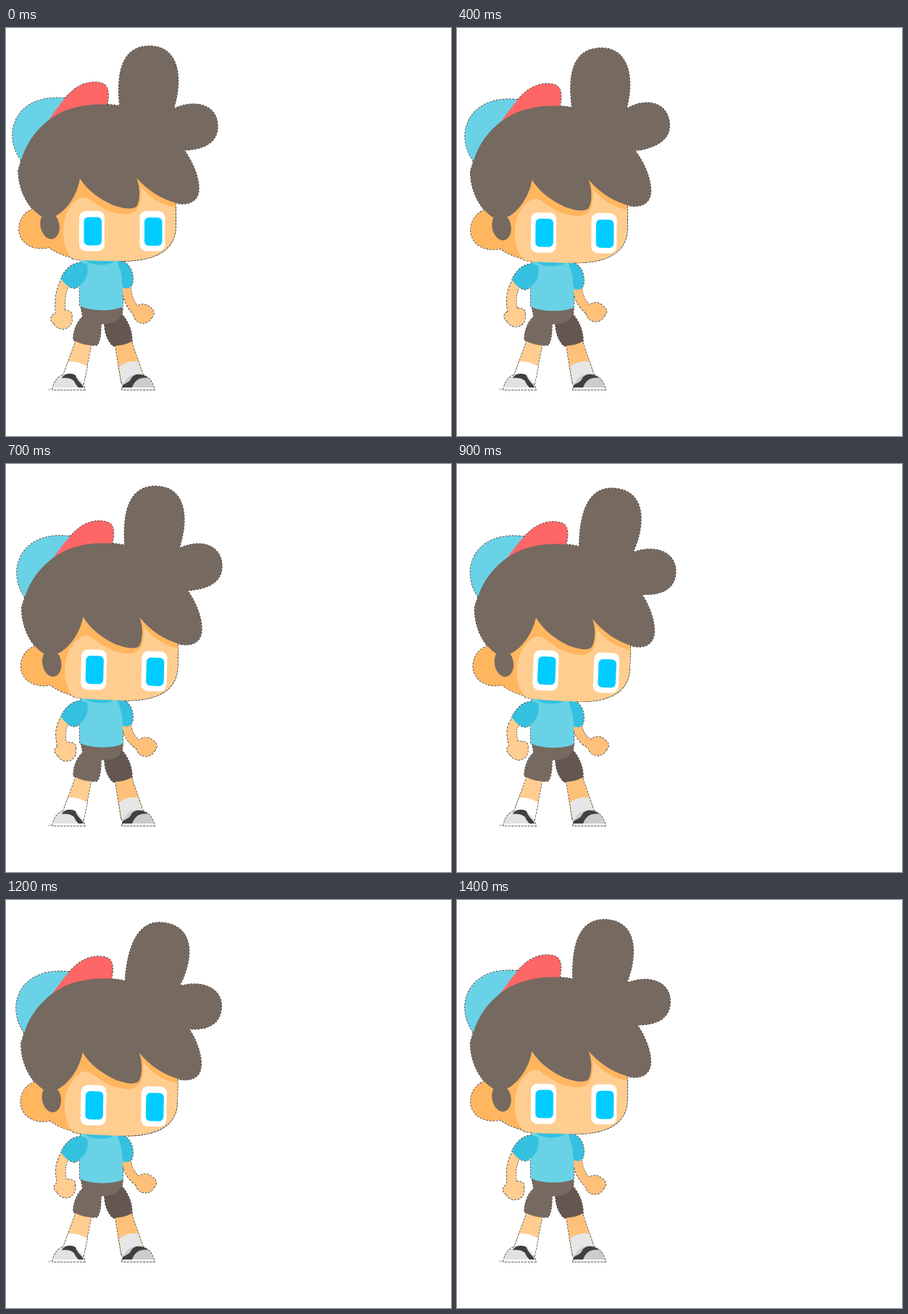
An HTML page with a canvas that plays this animation: 614x564 px, repeating every 1500 ms.

```html
<!DOCTYPE html>
<html lang="en">
<head>
<meta charset="utf-8">
<title>Idle boy</title>
<style>
html, body { margin: 0; width: 100%; height: 100%; overflow: hidden; background: #fff; }
canvas { display: block; }
</style>
</head>
<body>
<canvas id="stage" width="614" height="564"></canvas>
<script>
const ctx = document.getElementById('stage').getContext('2d');
const LOOP = 1500, STEP = 100, RIM = 1.4;

const C = {
  hair: '#766960', shade: '#645751', skin: '#ffcd90', skinDark: '#ffb65f', limb: '#ffc079',
  cap: '#6ad2e6', red: '#ff6666', sleeve: '#34c1e0', eye: '#00ccff', white: '#fff',
  sock: '#e6e6e6', shoeL: '#e2e2e2', shoeR: '#cccccc', lace: '#404040', edge: '#3a3632'
};

// Keys are [time, value] pairs, linear in between.
const TRACKS = {
  sink:  [[0, 0], [900, 1], [1000, 1.02], [1200, .63], [1400, .23], [1500, 0]],
  tilt:  [[0, 0], [400, .22], [600, .43], [700, .64], [900, 1], [1000, .96], [1200, .53], [1400, .2], [1500, 0]],
  crest: [[0, 0], [400, -.045], [500, -.045], [700, .01], [900, .09], [1200, .185], [1400, .075], [1500, 0]],
  lock:  [[0, 0], [400, -.15], [500, -.14], [700, -.06], [900, .075], [1200, .16], [1400, .075], [1500, 0]]
};

const P = {};
const shapes = {
  cap: 'M21 183C13 172 9 160 9 147C10 116 36 93 80 97L100 120L40 180Z',
  flap: 'M54 134C70 112 80 96 94 85C108 74 124 73 134 77C143 82 142 96 139 108L100 130Z',
  hair: 'M21 183C30 150 58 119 95 110C115 104.5 140 104 158 108L231 112L245 168C257 184 266 205 266 222' +
        'C266 237 256 244 240 243C215 238 195 224 180 207C186 222 185 240 180 247C172 252 160 249 148 245' +
        'C128 236 112 224 102 208C99 228 86 250 70 259L50 261C28 248 17 220 17 197Z',
  crest: 'M157 108C152 62 160 25 198 25C240 25 244 72 231 112L215 150L165 150Z',
  lock: 'M231 112C262 97 292 107 292 136C292 160 270 168 245 169L205 160L210 125Z',
  ear: 'M37 250C23 256 18 267 18 279C19 298 38 309 61 303L75 270Z',
  head: 'M40 240L100 195H234V274C234 306 208 323 155 322C105 322 75 317 58 302Z',
  face: 'M92 319C80 306 76 286 81 264C86 246 98 234 108 234C120 236 132 256 165 257.5' +
        'C182 257 188 246 186 219C199 236 215 245 234 248V274C234 306 208 323 155 322C130 322 105 322 92 319Z',
  shirt: 'M104 318H156C161 340 162 360 161 385C150 392 115 392 102 384C101 365 102 350 101 340Z',
  collar: 'M108 320H152C146 330 116 330 108 320Z',
  sleeveL: 'M112 327C100 320 84 328 76 346C80 354 88 359 95 360C108 354 115 342 112 327Z',
  sleeveR: 'M153 322C166 321 176 332 175 350C174 356 172 359 168 360L161 359C161 345 158 334 153 322Z',
  shortsL: 'M103 384L161 387C161 402 152 409 136 409H131C131 422 130 432 126 438C114 440 102 437 93 431C93 418 98 406 106 399Z',
  shortsR: 'M136 409C150 409 158 403 160 396C168 405 174 418 174 433C165 438 155 440 147 439C139 430 136 420 136 409Z',
  legL: 'M98 428L118 436L107 490L78 482Z',
  legR: 'M150 434L172 430L191 485L159 490Z',
  sockL: 'M86 461Q100 460 112 468L107 492L78 484Z',
  sockR: 'M156 468Q167 459 182 461L191 486L160 492Z',
  shoeL: 'M64 500C66 485 76 478 88 478C98 479 106 488 109 500Z',
  laceL: 'M77 484C80 477 90 476 96 480C98 488 104 490 107 497H100C97 494 95 491 94 488C90 484 84 483 77 484Z',
  shoeR: 'M160 500C162 488 168 480 180 478C192 478 202 485 205 500Z',
  laceR: 'M173 484C176 478 188 476 196 484C186 482 178 486 174 497H160C161 490 170 492 173 484Z'
};
for (const name in shapes) P[name] = new Path2D(shapes[name]);

let outline = false;

function track(name, t) {
  const keys = TRACKS[name];
  const i = keys.findIndex(k => k[0] > t);
  const [t0, a] = keys[i - 1], [t1, b] = keys[i];
  return a + (b - a) * (t - t0) / (t1 - t0);
}

function paint(path, color) {
  if (outline) {
    ctx.lineWidth = RIM;
    ctx.stroke(path);
  } else {
    ctx.fillStyle = color;
    ctx.fill(path);
  }
}

function disc(x, y, rx, color, ry = rx, turn = 0) {
  const p = new Path2D();
  p.ellipse(x, y, rx, ry, turn, 0, Math.PI * 2);
  paint(p, color);
}

function box(x, y, w, h, r, color) {
  const p = new Path2D();
  p.roundRect(x, y, w, h, r);
  paint(p, color);
}

function limb(points, width, color) {
  const [x, y, ...curve] = points;
  ctx.beginPath();
  ctx.moveTo(x, y);
  ctx.bezierCurveTo(...curve);
  ctx.lineWidth = outline ? width + RIM : width;
  ctx.strokeStyle = outline ? C.edge : color;
  ctx.stroke();
}

function shifted(dx, dy, draw) {
  ctx.save();
  ctx.translate(dx, dy);
  draw();
  ctx.restore();
}

function turned(x, y, angle, draw) {
  ctx.save();
  ctx.translate(x, y);
  ctx.rotate(angle);
  ctx.translate(-x, -y);
  draw();
  ctx.restore();
}

function drawLegs() {
  paint(P.legL, C.skin);
  paint(P.legR, C.limb);
  paint(P.sockL, C.white);
  paint(P.sockR, C.sock);
  for (const side of ['L', 'R']) {
    paint(P['shoe' + side], C['shoe' + side]);
    if (!outline) paint(P['lace' + side], C.lace);
  }
  if (!outline) {
    ctx.fillStyle = C.white;
    ctx.fillRect(65, 497, 43, 2.5);
    ctx.fillRect(161, 497, 43, 2.5);
  } else {
    ctx.fillStyle = '#aaa';
    ctx.fillRect(58, 499, 8, 1);
  }
  paint(P.shortsR, C.shade);
  paint(P.shortsL, C.hair);
}

function drawBody(v) {
  const drop = 4 * v;
  limb([166, 354 + drop, 166, 369 + v, 170 + 2 * v, 382, 182 + 5 * v, 394 - 5 * v], 12, C.limb);
  shifted(5 * v, -5 * v, () => {
    disc(189, 395, 13, C.limb);
    disc(196, 394, 8, C.limb);
  });
  shifted(0, 2 * v, () => paint(P.shirt, C.cap));
  shifted(0, drop, () => {
    paint(P.collar, C.sleeve);
    paint(P.sleeveR, C.sleeve);
  });
  limb([86, 345 + drop, 74, 362, 74, 376 - 5 * v, 75 + 3 * v, 394 - 6 * v], 13, C.skin);
  shifted(7 * v, -7 * v, () => {
    disc(78, 403, 13, C.skin);
    disc(69, 402, 7, C.skin);
    disc(85, 397, 6, C.skin);
  });
  shifted(0, drop, () => paint(P.sleeveL, C.sleeve));
}

function drawHead(t) {
  paint(P.cap, C.cap);
  paint(P.flap, C.red);
  paint(P.ear, C.skinDark);
  paint(P.head, C.skinDark);
  paint(P.face, C.skin);
  box(101, 253, 35, 55.5, 9, C.white);
  box(184.5, 253, 35, 55.5, 9, C.white);
  box(107.5, 261.5, 24.5, 39, 6, C.eye);
  box(191, 262, 24.5, 39, 6, C.eye);
  paint(P.hair, C.hair);
  disc(60.5, 273, 13, C.hair, 19, -.2);
  turned(195, 115, track('crest', t), () => paint(P.crest, C.hair));
  turned(225, 140, track('lock', t), () => paint(P.lock, C.hair));
}

function drawBoy(t) {
  const v = track('sink', t), r = track('tilt', t);
  ctx.strokeStyle = C.edge;
  ctx.setLineDash(outline ? [3, 1.5] : []);
  drawLegs();
  drawBody(v);
  shifted(2.4 * r, 5 * v, () => turned(130, 320, .04 * r, () => drawHead(t)));
}

function frame() {
  const t = Math.floor(performance.now() % LOOP / STEP) * STEP;
  ctx.fillStyle = C.white;
  ctx.fillRect(0, 0, 614, 564);
  // The broken dark rim goes down first; the fills then cover its inner half.
  for (outline of [true, false]) drawBoy(t);
  requestAnimationFrame(frame);
}
frame();
</script>
</body>
</html>
```
